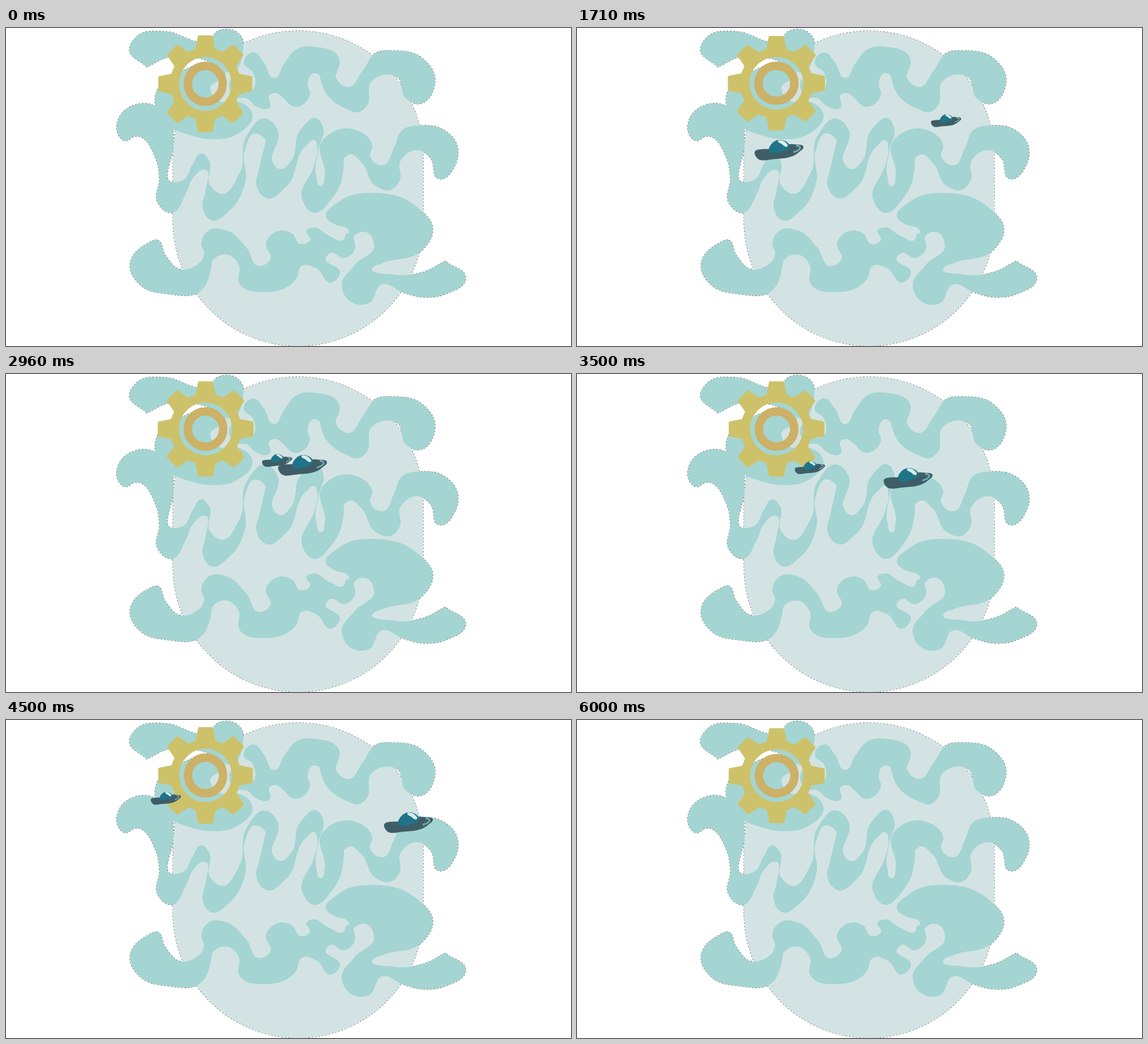
An HTML page with a canvas for the animation above (6040 ms loop, 998x561 px).

```html
<!DOCTYPE html>
<html>
<head>
<meta charset="utf-8">
<style>
html, body { margin: 0; width: 100%; height: 100%; overflow: hidden; background: #fff; }
canvas { display: block; }
</style>
</head>
<body>
<canvas id="stage" width="998" height="561"></canvas>
<script>
const ctx = document.getElementById('stage').getContext('2d');
const LOOP = 6040, FRAME = 1000 / 24;
const TEAL = '#a4d5d2', PALE = '#d3e3e3', GOLD = '#cdc26a', BRONZE = '#ccb166';

// Closed smooth curve whose tangents follow the circle through each three
// neighbouring points; a repeated point makes a corner.
function blob(text) {
  const pts = text.trim().split(/\s+/).map(p => p.split(',').map(Number));
  const at = i => pts[(i + pts.length) % pts.length];
  const dist = (a, b) => Math.hypot(b[0] - a[0], b[1] - a[1]);
  const tangent = i => {
    const a = at(i - 1), p = at(i), b = at(i + 1);
    const m = dist(a, p) ** 2 || Infinity, n = dist(p, b) ** 2 || Infinity;
    const v = [0, 1].map(k => (p[k] - a[k]) / m + (b[k] - p[k]) / n);
    const len = Math.hypot(...v) || 1;
    return v.map(c => c / len);
  };
  const path = new Path2D();
  path.moveTo(...pts[0]);
  pts.forEach((p, i) => {
    const q = at(i + 1), reach = dist(p, q) * 0.36;
    const u = tangent(i), v = tangent(i + 1);
    path.bezierCurveTo(p[0] + u[0] * reach, p[1] + u[1] * reach,
      q[0] - v[0] * reach, q[1] - v[1] * reach, ...q);
  });
  path.closePath();
  return path;
}

const capsule = new Path2D();
capsule.arc(516, 226, 221, Math.PI, 0);
capsule.arc(516, 340, 221, 0, Math.PI);
capsule.closePath();

const lobe = new Path2D();
lobe.ellipse(399, 101, 5, 12, 0, 0, 7);

const horn = blob(`249,69 249,69 218,36 230,16 280,6 336,24 366,30 366,14 390,2 416,16
  418,44 400,78 366,62 340,53 315,49 285,52`);
const bowl = blob(`266,145 266,112 300,82 360,66 388,79 361,107 380,130 400,128 435,152
  405,189 365,196 325,189 285,170`);
const topLeft = blob(`420,62 437,43 455,60 475,88 490,65 518,35 545,33 589,55 582,85 582,85
  565,115 565,115 562,95 543,80 533,100 537,115 510,139 488,122 478,115 466,118 466,140
  440,137 427,125 405,120 438,106 436,78`);
const topRight = blob(`589,55 589,55 582,85 603,104 630,75 655,43 682,40 735,53 758,93
  727,134 707,125 690,86 665,83 646,94 637,138 625,148 600,142 565,115 553,82 553,82`);
const midLeft = blob(`266,138 240,133 197,165 196,182 211,199 228,191 265,232 271,265 268,308
  290,326 318,292 330,265 350,250 352,290 347,315 362,339 395,322 423,270 422,215 441,186
  459,198 447,250 447,250 469,230 469,230 479,178 460,160 425,190 413,255 378,292 361,278
  358,232 346,221 330,240 313,268 296,272 296,200 288,150`);
const midCentre = blob(`459,198 459,198 447,250 442,275 460,300 495,280 530,208 545,198
  550,212 545,240 524,305 540,325 578,298 596,250 597,230 597,230 557,220 557,220 563,260
  556,279 548,260 552,215 560,175 550,160 520,180 503,235 485,249 469,230 473,205 473,205`);
const midRight = blob(`592,275 592,275 597,230 608,223 626,235 655,280 678,286 695,270 697,234
  730,216 750,230 764,266 795,238 798,212 770,178 735,172 700,180 685,212 665,242 643,225
  647,209 615,179 570,188 557,202 563,250 563,250`);
const lowLeft = blob(`267,374 250,380 219,420 238,454 285,469 346,462 361,430 364,412 364,412
  345,380 345,380 350,398 330,422 310,426 281,400`);
const lowRight = blob(`361,430 361,430 364,412 392,400 411,418 412,450 460,466 511,445 524,419
  548,424 575,449 590,432 565,405 573,397 597,406 617,385 601,363 597,373 570,366 543,352
  531,357 537,374 520,381 506,363 490,357 459,380 467,408 448,420 425,388 390,357 360,356
  345,380 350,398 345,414 345,414`);
const two = blob(`566,335 590,305 650,291 725,315 754,357 735,392 665,415 648,423 685,435
  735,431 776,411 776,411 812,443 780,468 740,475 700,466 665,452 640,486 615,486 593,455
  615,419 650,382 638,361 616,366 611,377 604,355 580,346`);
const teal = [horn, bowl, lobe, topLeft, topRight, midLeft, midCentre, midRight,
  lowLeft, lowRight, two];

const saucer = blob('-43,8 -40,14 -8,17 36,4 43,-4 28,-9 -10,-2');
const dome = blob('-18,2 -14,-9 2,-17 18,-5 4,4');
const glint = blob('-2,-15 5,-16 14,-5 4,-10');
const shine = new Path2D('M25 5Q38 1 37 -4Q36 -7 30 -6.5');

const gear = new Path2D();
for (let i = 0; i < 8; i++) {
  const a = i * Math.PI / 4, c = Math.cos(a), s = Math.sin(a);
  for (const [r, w] of [[60, -16], [83, -11.5], [83, 11.5], [60, 16]])
    gear.lineTo(r * c - w * s, r * s + w * c);
}
gear.closePath();
gear.moveTo(49, 0);
gear.arc(0, 0, 49, 0, 2 * Math.PI, true);

// Time, left, right, top, bottom
const gearPoses = [
  [0, 269, 435, 13, 184], [750, 267.5, 436, 14, 182], [1700, 266.5, 438, 14, 181],
  [2900, 268, 437, 13, 181], [3870, 269, 436, 12.5, 183], [5000, 268, 437.5, 14.5, 182]
];

// Time, x, y
const bigPath = [
  [130, 151, 213], [710, 223, 164], [1000, 265, 162], [1330, 307, 185], [1970, 392, 226],
  [2330, 441, 196], [2630, 481, 171], [2950, 523, 160], [3500, 585, 183], [3900, 633, 219],
  [4500, 711, 180], [5080, 787, 160], [5460, 837, 166], [5920, 888, 210]
];
const smallPath = [
  [920, 736, 151], [1000, 730, 155.5], [1330, 700, 175], [1600, 666, 170], [1960, 618, 143],
  [2330, 560, 127.5], [3300, 436, 166], [3500, 411.5, 164.5], [3830, 367, 148],
  [4200, 319, 134], [4500, 282.5, 137.5], [5460, 166, 181.5], [5670, 151, 196]
];

function along(keys, t) {
  const last = keys.length - 1;
  let i = 0;
  while (i < last - 1 && t >= keys[i + 1][0]) i++;
  const a = keys[i], b = keys[i + 1], span = b[0] - a[0];
  const u = Math.min(1, Math.max(0, (t - a[0]) / span));
  const slope = (j, k) => {
    const p = keys[Math.max(0, j - 1)], q = keys[Math.min(last, j + 1)];
    return (q[k] - p[k]) / (q[0] - p[0]) * span;
  };
  return [1, 2].map(k => {
    const m = slope(i, k), n = slope(i + 1, k), d = b[k] - a[k];
    return a[k] + u * (m + u * (3 * d - 2 * m - n + u * (m + n - 2 * d)));
  });
}

function fill(path, color) {
  ctx.fillStyle = color;
  ctx.fill(path);
}

function drawUfo([x, y], scale) {
  ctx.save();
  ctx.translate(x, y);
  ctx.scale(scale, scale);
  fill(saucer, '#3f5d67');
  fill(dome, '#1f7488');
  fill(glint, '#d8eeee');
  ctx.strokeStyle = '#6fa9ac';
  ctx.lineWidth = 3;
  ctx.stroke(shine);
  ctx.restore();
}

function drawGear(t) {
  const [, l, r, top, bottom] = gearPoses.filter(p => p[0] <= t).pop();
  ctx.save();
  ctx.translate((l + r) / 2, (top + bottom) / 2);
  ctx.scale((r - l) / 170, (bottom - top) / 170);
  fill(gear, GOLD);
  ctx.strokeStyle = GOLD;
  ctx.lineWidth = 4;
  ctx.lineJoin = 'round';
  ctx.stroke(gear);
  ctx.beginPath();
  ctx.arc(0, 0, 31.5, 0, 2 * Math.PI);
  ctx.strokeStyle = BRONZE;
  ctx.lineWidth = 15;
  ctx.stroke();
  ctx.restore();
}

function draw(t) {
  ctx.fillStyle = '#fff';
  ctx.fillRect(0, 0, 998, 561);
  ctx.save();
  ctx.setLineDash([3, 3]);
  ctx.lineWidth = 1.3;
  ctx.strokeStyle = '#666';
  [capsule, ...teal].forEach(p => ctx.stroke(p));
  ctx.restore();
  fill(capsule, PALE);
  teal.forEach(p => fill(p, TEAL));
  drawGear(t);
  if (t >= 920 && t < 5670) {
    const alpha = Math.min(1, (t - 910) / 160);
    ctx.save();
    // While faint, the small saucer shows only over the capsule.
    if (alpha < 0.6) ctx.clip(capsule);
    ctx.globalAlpha = alpha;
    drawUfo(along(smallPath, t), 0.62);
    ctx.restore();
  }
  if (t >= 124 && t < 5950) drawUfo(along(bigPath, t), 1);
}

const start = performance.now();
function tick() {
  const t = (performance.now() - start) % LOOP;
  draw(Math.floor((t + 4) / FRAME) * FRAME);
  requestAnimationFrame(tick);
}
tick();
</script>
</body>
</html>
```
